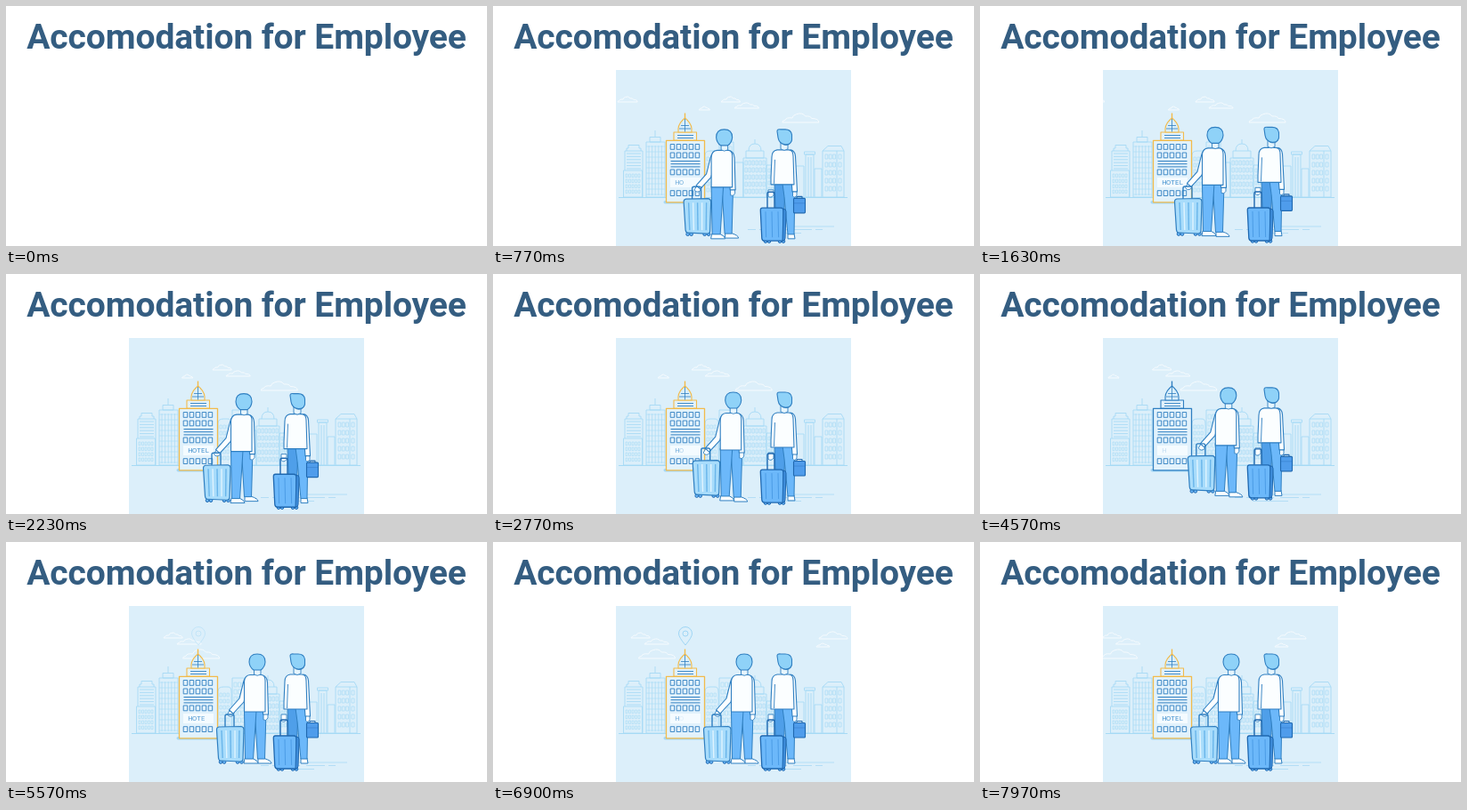
These frames come from a looping animation (540x270 px, 8 s). An HTML page with a canvas:

```html
<!DOCTYPE html>
<html lang="en">
<head>
<meta charset="utf-8">
<title>Accomodation for Employee</title>
<style>
  html, body { margin: 0; width: 100%; height: 100%; overflow: hidden; background: #fff; }
  canvas { position: absolute; left: 0; top: 0; width: 540px; height: 270px; }
  h1 {
    position: absolute; left: 0; top: 12px; width: 540px; margin: 0;
    font: 700 39px Roboto, "Open Sans", sans-serif; letter-spacing: -0.1px;
    text-align: center; white-space: nowrap; color: #345d81;
  }
</style>
</head>
<body>
<canvas id="stage"></canvas>
<h1>Accomodation for Employee</h1>
<script>
const canvas = document.getElementById('stage');
const ctx = canvas.getContext('2d');
const ratio = window.devicePixelRatio || 1;
canvas.width = 540 * ratio;
canvas.height = 270 * ratio;

const LOOP = 8000, FPS = 15, ARRIVE = 5.2, STRIDE = 1.73;
const SKY = '#dceffa', PALE = '#a6daf5', LINE = '#2f7fc1', DARK = '#1f68b0';
const WHITE = '#fbfeff', HAIR = '#8fd2f8', JEANS = '#6cb8fa', ORANGE = [242, 187, 75], BLUE = [47, 127, 193];

const clamp = (v, a = 0, b = 1) => Math.min(b, Math.max(a, v));
const ramp = (t, a, b) => clamp((t - a) / (b - a));

function paint(path, fill, stroke, width = 1) {
  if (fill) { ctx.fillStyle = fill; ctx.fill(path); }
  if (stroke) { ctx.strokeStyle = stroke; ctx.lineWidth = width; ctx.stroke(path); }
}
function shape(d, fill, stroke, width) { paint(new Path2D(d), fill, stroke, width); }
function box(x, y, w, h, fill, stroke, width, r = 0) {
  const p = new Path2D();
  p.roundRect(x, y, w, h, r);
  paint(p, fill, stroke, width);
}
function disc(x, y, r, fill, stroke, width) {
  const p = new Path2D();
  p.arc(x, y, r, 0, Math.PI * 2);
  paint(p, fill, stroke, width);
}
function line(x1, y1, x2, y2, color, width = 1) {
  shape(`M${x1} ${y1}L${x2} ${y2}`, null, color, width);
}
function grid(x, y, cols, rows, dx, dy, w, h, color, width) {
  for (let r = 0; r < rows; r++)
    for (let c = 0; c < cols; c++) box(x + c * dx, y + r * dy, w, h, null, color, width);
}
function shifted(dx, dy, draw) {
  ctx.save();
  ctx.translate(dx, dy);
  draw();
  ctx.restore();
}

// Clouds: x at time zero, speed in px/s, top, width, height
const CLOUDS = [
  { x: 345, v: 26.3, y: 121, w: 41, h: 10 },
  { x: 269, v: 16.5, y: 102, w: 21, h: 6 },
  { x: 284, v: 16.5, y: 109, w: 27, h: 6 },
  { x: 249, v: 23, y: 113, w: 12, h: 4 },
  { x: 160, v: 26, y: 102, w: 22, h: 6 },
  { x: 573, v: 30, y: 101, w: 32, h: 8 },
  { x: 570, v: 30, y: 114, w: 15, h: 4 }
];
function cloud({ x, v, y, w, h }, t) {
  shifted(x - v * t, y, () => shape(
    `M0 ${h}H${w}Q${w} ${h * .55} ${w * .8} ${h * .55}Q${w * .78} ${h * .25} ${w * .63} ${h * .3}` +
    `Q${w * .55} ${-h * .18} ${w * .38} ${h * .08}Q${w * .28} ${h * .2} ${w * .27} ${h * .5}` +
    `Q${w * .1} ${h * .4} ${w * .08} ${h * .75}Q0 ${h * .75} 0 ${h}Z`, SKY, '#f6fbfe', 1));
}

function skyline() {
  const c = PALE, w = .9;
  // left pair
  box(148, 163, 20, 52, null, c, w);
  shape('M150 163V160H152V156.5H164V160H166V163', null, c, w);
  for (let y = 166; y < 186; y += 3.4) line(150, y, 166, y, c, w);
  box(146.5, 185, 21, 30, SKY, c, w);
  grid(149, 189, 5, 4, 3.5, 6, 2, 3.6, c, .6);
  box(172, 153, 21, 62, null, c, w);
  box(176, 147.5, 12, 5.5, null, c, w);
  line(182, 140, 182, 147, c, w);
  for (let x = 175; x < 192; x += 3.6) line(x, 157, x, 213, c, .7);
  for (let y = 158; y < 213; y += 6) line(172, y, 193, y, c, .6);
  // middle blocks
  shape('M238 215V168Q238 163 244 163H249Q253 163 253 168V215', null, c, w);
  grid(240, 170, 3, 6, 4, 7, 2.4, 4, c, .6);
  box(254, 153, 16, 62, null, c, w);
  grid(256, 158, 3, 7, 4.5, 8, 3, 5, c, .6);
  box(271, 176, 10, 39, null, c, w);
  // domed hall
  box(281, 171, 26, 44, null, c, w);
  box(284, 163, 20, 8, null, c, w);
  shape('M287 163Q287 155 294 155Q301 155 301 163M294 150V155', null, c, w);
  grid(283, 174, 6, 5, 4, 8, 2.3, 5, c, .7);
  box(307, 179, 12, 36, null, c, w);
  grid(309, 183, 3, 4, 3.5, 7, 2, 4, c, .6);
  // right side
  box(339, 180, 10, 35, null, c, w);
  box(351, 167, 9, 48, null, c, w);
  box(349.5, 164, 12, 3, null, c, w);
  line(354, 170, 354, 215, c, w);
  line(357, 170, 357, 215, c, w);
  box(361, 183, 8, 32, null, c, w);
  box(370, 163, 24, 52, null, c, w);
  shape('M370 163L376 157.5H391L394 163M386 163V215', null, c, w);
  grid(373, 167, 3, 5, 4.3, 9, 2.8, 5, c, .7);
  grid(388, 167, 1, 5, 1, 9, 3, 5, c, .7);
  line(141, 215.5, 398, 215.5, c, 1);
}

function ripples() {
  for (const [a, b, y] of [[304, 383, 248], [286, 295, 251.5], [299, 330, 251.5], [337, 358, 251.5], [362, 370, 251.5], [306, 346, 255.5]])
    line(a, y, b, y, '#a9d9f5', .8);
}

function hotel(t) {
  const k = ramp(t, 3.05, 3.25) - ramp(t, 5.1, 5.3);
  const edge = `rgb(${ORANGE.map((v, i) => Math.round(v + (BLUE[i] - v) * k))})`;
  box(191.5, 219, 48, 3.6, '#a4d7f5', null, 0, 1.8);
  box(194.5, 151.3, 43, 69.5, '#e2f2fc', edge, 1.3);
  box(203, 142, 25.5, 9, '#e2f2fc', edge, 1.1);
  shape('M208 142V138Q208.5 131.5 215.5 126Q222.5 131.5 223 138V142Z', '#d8eefb', edge, 1.1);
  line(215.5, 120.5, 215.5, 127, edge, 1.4);
  shape('M215.5 127V141.5M209 138H222M211 134.5H220', null, LINE, .8);
  line(207, 145.5, 225, 145.5, LINE, .9);
  line(207, 148.5, 225, 148.5, LINE, .9);
  for (const y of [155.5, 165, 184, 207.7]) grid(199.2, y, 5, 1, 7, 0, 4.5, 5.8, LINE, .9);
  for (const y of [174.5, 177.7, 180.9]) line(199.5, y, 232.5, y, LINE, 1);
  box(198.5, 192.5, 35, 12, '#f4fbff', '#d5ebf8', .5);
  sign(t);
}

// Letters light up one after another, then restart
function sign(t) {
  const since = ((t - .2 + 2.12) % 2.12) / .29;
  ctx.font = '400 7.5px Roboto, sans-serif';
  ctx.textAlign = 'center';
  ctx.fillStyle = '#3f8fcd';
  [...'HOTEL'].forEach((ch, i) => {
    ctx.globalAlpha = clamp(since - i) * (.6 + .4 * clamp(since / 5));
    ctx.fillText(ch, 207 + i * 4.7, 201.2);
  });
  ctx.globalAlpha = 1;
}

function pin(t) {
  ctx.globalAlpha = ramp(t, 5.4, 5.8) - ramp(t, 7.4, 7.8);
  shape('M216 116Q208.5 107 208.5 103A7.5 7.5 0 0 1 223.5 103Q223.5 107 216 116Z', null, '#9fd6f5', 1);
  disc(216, 103, 3, null, '#9fd6f5', 1);
  ctx.globalAlpha = 1;
}

function wheels(xs, y) {
  for (const x of xs) disc(x, y, 1.8, JEANS, DARK, 1);
}

function leftCase() {
  shape('M246 208V196Q246 194 248 194H254Q256 194 256 196V208', null, LINE, 1.4);
  wheels([241, 245, 260, 264.5], 247.5);
  shape('M239 208L264 207.5Q267 208 267 211L266 244Q266 247 263 247L241 246Q239 246 238.5 243L236.5 211Q236.5 208.5 239 208Z', '#a8dcfb', LINE, 1.2);
  for (let i = 0; i < 5; i++) line(242 + i * 5, 212, 243.2 + i * 4.6, 243, i % 2 ? '#dff3fe' : '#69b5ea', 1.4);
}

function leftMan([a, b], hop) {
  // legs and shoes
  shifted(0, -b, () => {
    shape('M283 243.5H290Q298 246 298 249H283Z', WHITE, LINE, 1);
    shape('M279 190H292L290.5 244H282.5L280 202Z', JEANS, LINE, 1);
  });
  shifted(0, -a, () => {
    shape('M268 243.5H277Q283 246 283 249H267Z', WHITE, LINE, 1);
    shape('M267.5 190H281L277.5 244H268.5Z', JEANS, LINE, 1);
  });
  // hanging arm
  shape('M289 192V200Q292 202 294 198V192Z', WHITE, LINE, .9);
  shape('M288 150Q293 151 293.5 158L294.5 194H288.5Z', WHITE, LINE, 1.1);
  // pulling arm
  shape('M252 188L248.5 194Q251 198 255 195L257 190Z', WHITE, LINE, .9);
  shape('M274 150Q268 151 266.5 158L262 176L250.5 189L255 193L267 180L271 166Z', WHITE, LINE, 1.1);
  shape('M274 149.5H287Q291 150 291 156V191H267.5V157Q268 150 274 149.5Z', WHITE, LINE, 1.1);
  // neck and head
  shape('M278.5 142V149Q282 151.5 286 149V142Z', '#e6f5fd', LINE, .9);
  shape('M273 135Q273 126 282 126Q291 126 291 135Q290.5 141 286 144H278Q273.5 141 273 135Z', HAIR, LINE, 1.1);
  shifted(0, -hop, leftCase);
}

function rightCase() {
  shape('M308 218V202Q308 200 310 200H314Q316 200 316 202V218', null, DARK, 1.4);
  wheels([306, 310, 322, 326], 255.5);
  shape('M302.5 218H323Q326 218 326 221V255H305Q302 255 301.8 252L300.3 221Q300 218 302.5 218Z', JEANS, DARK, 1.3);
  shape('M326 219Q329 219 329 222L328 252Q328 255 325 255Z', '#3f8edc', DARK, 1);
  for (const x of [306, 313, 320]) line(x, 222, x + .6, 251, '#4b9ce6', 1);
}

function rightMan([a, b], hop) {
  shifted(0, -a, () => {
    shape('M318 242H326V248H317Z', WHITE, LINE, 1);
    shape('M316 187H328L326 244H318Z', '#4f9fe9', LINE, 1);
  });
  shifted(0, -b, () => {
    shape('M331 243H338L339 249H331Z', WHITE, LINE, 1);
    shape('M325 187H339L338 244H331L327 202Z', JEANS, LINE, 1);
  });
  // briefcase
  shape('M341 204V201.5H347V204', null, DARK, 1.1);
  box(337.5, 203.5, 13, 16.5, '#4f9ceb', DARK, 1.1, 1);
  line(338, 209, 350, 209, '#3b84d2', .8);
  // arms and shirt
  shape('M336.5 195V201Q339 204 341 200V195Z', WHITE, LINE, .9);
  shape('M334 149Q339 150 339.5 156L341.5 196H336L334 170Z', WHITE, LINE, 1.1);
  shape('M309 194V201Q312 204 315 200V194Z', WHITE, LINE, .9);
  shape('M319 149Q313 150 313 157L312 180V188H338L337 156Q337 149 332 149Z', WHITE, LINE, 1.1);
  line(316.5, 160, 315.5, 187, LINE, .9);
  // neck and head
  shape('M323 141V148Q327 151 331 148V141Z', '#e6f5fd', LINE, .9);
  shape('M323 134V140Q325 144 330 143.5Q335 143 335 137V133Z', WHITE, LINE, .9);
  shape('M319 128Q319 125.5 323 126H328Q334.5 126 335.5 132L335.5 138Q334 143.5 328 143Q321 142 320 135Z', HAIR, LINE, 1.1);
  shifted(0, -hop, rightCase);
}

function render(t) {
  ctx.setTransform(ratio, 0, 0, ratio, 0, 0);
  ctx.clearRect(0, 0, 540, 270);
  if (t < .1) return;
  ctx.save();
  ctx.beginPath();
  ctx.rect(138, 72, 264, 198);
  ctx.clip();
  ctx.lineJoin = 'round';
  ctx.fillStyle = SKY;
  ctx.fillRect(138, 72, 264, 198);
  CLOUDS.forEach(c => cloud(c, t));
  skyline();
  ripples();
  pin(t);
  hotel(t);

  // Feet alternate and the cases hop once per stride until both men arrive
  const left = Math.max(0, ARRIVE - t);
  const phase = left * Math.PI * 2 / STRIDE;
  const swing = Math.sin(phase);
  const lift = [2 * Math.max(0, swing), 2 * Math.max(0, -swing)];
  const hop = left ? 2.5 * (1 - Math.cos(phase + .7)) * Math.min(1, left * 2) : 0;
  shifted(-5.05 * left, 2.9 * left, () => leftMan(lift, hop));
  shifted(0, 2.9 * left, () => rightMan([lift[1], lift[0]], hop));
  ctx.restore();
}

function tick() {
  const ms = performance.now() % LOOP;
  const step = Math.floor((ms / 1000 - 1 / 30) * FPS + .05);
  render(step < 1 ? 0 : step / FPS + 1 / 30);
  requestAnimationFrame(tick);
}
tick();
</script>
</body>
</html>
```
